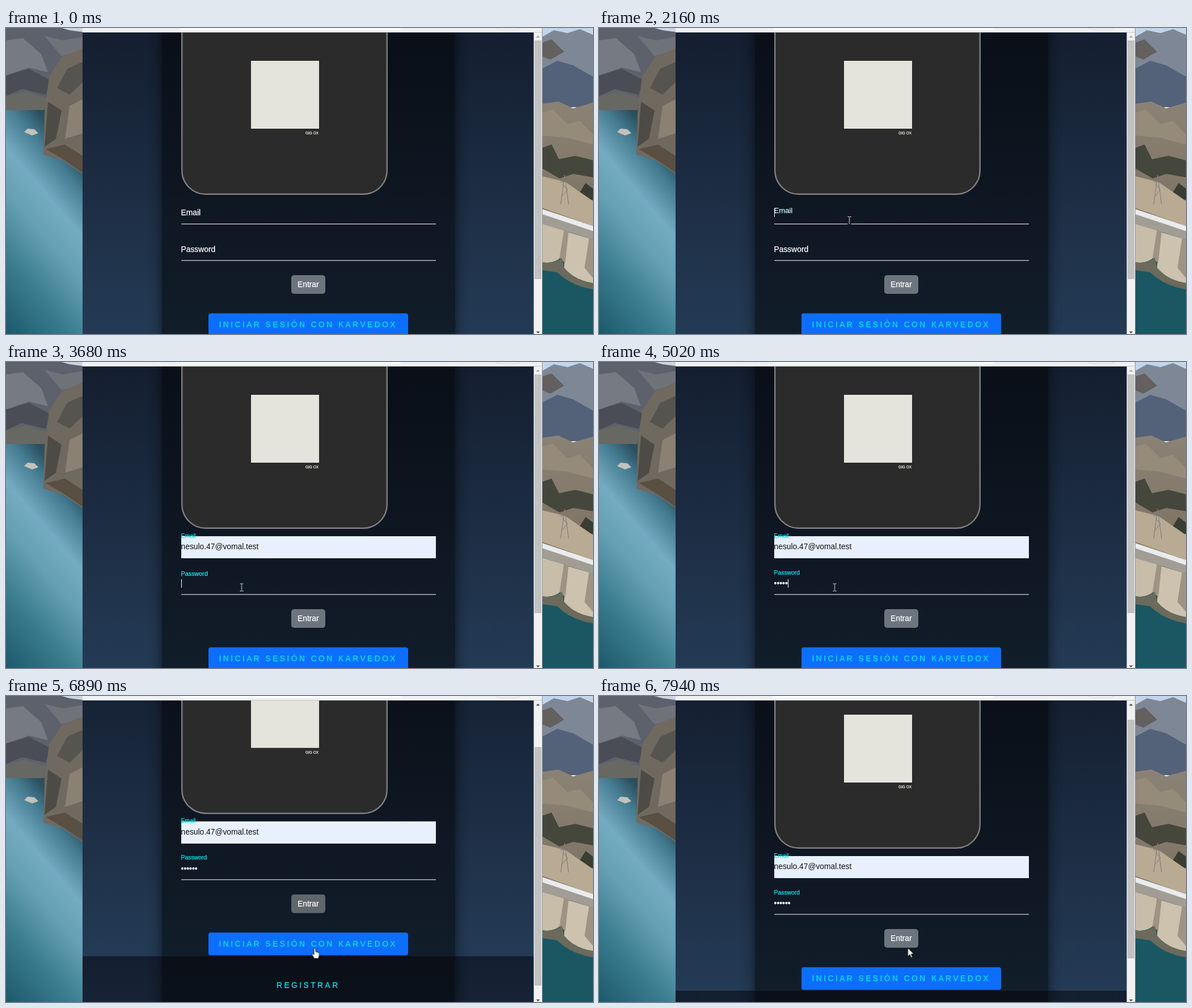
An HTML page for the animation above (8000 ms loop, 1035 px wide and 541 px high).

```html
<!DOCTYPE html>
<html lang="es">
<head>
<meta charset="utf-8">
<title>Login</title>
<style>
html, body { margin: 0; width: 100%; height: 100%; overflow: hidden; }
svg { display: block; width: 1035px; height: 541px; }
text {
  font: 13.8px "Liberation Sans", Arial, sans-serif;
  color: #fff; fill: currentColor; stroke: currentColor; stroke-width: .25; white-space: pre;
}
.link { letter-spacing: 3.45px; color: #03e9f4; }
.tiny { font-size: 6.5px; color: #e4e3dc; }
.menu text { font: 11.5px "Open Sans", "Noto Sans", sans-serif; color: #4c4c52; stroke: none; }
.off { opacity: 0; }
#mail { color: #111; stroke: none; }
#beam { mix-blend-mode: difference; fill: none; stroke: #fff; }
#arrow, #hand { fill: #fff; stroke: #000; stroke-width: .9; stroke-linejoin: round; }
</style>
</head>
<body>
<svg viewBox="0 0 1035 541">
  <defs>
    <linearGradient id="lake" x1=".4" x2="0" y2="1">
      <stop offset="0" stop-color="#2b4f5e"/><stop offset=".1" stop-color="#437a8f"/>
      <stop offset=".28" stop-color="#74abc2"/><stop offset=".45" stop-color="#66a0b4"/>
      <stop offset=".7" stop-color="#3a7d8f"/><stop offset="1" stop-color="#1c586a"/>
    </linearGradient>
    <linearGradient id="hill" x2="0" y2="1">
      <stop offset="0" stop-color="#8b8276"/><stop offset=".5" stop-color="#7d7362"/>
      <stop offset="1" stop-color="#b5a68e"/>
    </linearGradient>
    <linearGradient id="body" gradientUnits="userSpaceOnUse" x1="0" x2="0" y1="8" y2="546" spreadMethod="repeat">
      <stop stop-color="#141e30"/><stop offset="1" stop-color="#243b55"/>
    </linearGradient>
    <filter id="blur" x="-20%" width="140%"><feGaussianBlur stdDeviation="11"/></filter>
    <clipPath id="view"><path d="M135 8H931V541H135Z"/></clipPath>
    <clipPath id="right"><path d="M945 0H1035V541H945Z"/></clipPath>
    <mask id="around"><path d="M0-300H1035V900H0Z" fill="#fff"/><path d="M275-300H792V900H275Z"/></mask>
  </defs>

  <g id="lakeside">
    <path d="M0 0H135V160H0Z" fill="#5d616b"/>
    <path d="M98 0H135V7L112 4Z" fill="#c9d6e2"/>
    <path d="M0 22L30 18 62 46 74 78 40 70 0 84Z" fill="#767a83"/>
    <path d="M0 84L40 72 78 92 70 118 28 108 0 120Z" fill="#4a4d56"/>
    <path d="M68 14L100 22 135 16V40L98 50Z" fill="#70727a"/>
    <path d="M0 122L34 112 72 124 66 146 0 146Z" fill="#686863"/>
    <path d="M0 145H135V541H0Z" fill="url(#lake)"/>
    <path d="M135 36L98 52 76 86 68 150 66 224 100 234 135 258Z" fill="#70695f"/>
    <path d="M135 60L108 72 90 106 112 118 135 96Z" fill="#56544f"/>
    <path d="M74 130L98 146 88 196 68 210Z" fill="#4e4b46"/>
    <path d="M112 138L135 126V186L104 196Z" fill="#8a8174"/>
    <path d="M70 214L104 206 135 226V256L102 233Z" fill="#5a4f43"/>
    <path d="M32 184L38 178 50 179 57 186 46 190Z" fill="#c3c2bb"/>
  </g>

  <g id="dam" clip-path="url(#right)">
    <path d="M945 0H1035V40H945Z" fill="#c3d5e8"/>
    <path d="M945 16L966 4 990 9 1012 2 1035 12V140H945Z" fill="#7d8796"/>
    <path d="M945 72L972 58 1000 66 1035 86V140H945Z" fill="#536279"/>
    <path d="M945 26L962 20 984 42 960 56 945 50Z" fill="#63605f"/>
    <path d="M945 134L974 130 1000 142 1035 132V541H945Z" fill="url(#hill)"/>
    <path d="M945 150L964 144 990 170 1012 164 1035 188V206L990 194 945 190Z" fill="#968a79"/>
    <path d="M945 212L962 206 975 232 1004 226 1035 234V264L1000 258 976 266 945 248Z" fill="#45463c"/>
    <path d="M1012 290L1022 274 1035 284V304L1018 302Z" fill="#3a3d33"/>
    <path d="M945 262L986 272 1035 306V350L945 318Z" fill="#b9aa93"/>
    <path d="M978 312L985 260 992 312M980 298L990 286 981 276M977 272H993" fill="none" stroke="#777b7c"/>
    <path d="M945 320L1035 352V382L945 350Z" fill="#a19d94"/>
    <path d="M945 320L1035 350V359L945 329Z" fill="#e9ebec"/>
    <path d="M945 346L1035 374V541H945Z" fill="#1a5763"/>
    <path d="M945 346L984 358 980 404Q966 418 945 414Z" fill="#c8bda8"/>
    <path d="M988 360L1035 374V451Q1002 446 984 424Z" fill="#cdc2ad"/>
    <path d="M984 356L992 360 986 416 976 406ZM1028 372H1035V442L1020 424Z" fill="#9d9483"/>
    <path d="M945 414Q966 418 980 406L984 424Q1002 446 1035 451V462Q996 456 972 432L945 428Z" fill="#6b6a5c"/>
  </g>

  <path d="M135 0H946V541H135Z" fill="#f0f1f3"/>
  <path d="M306 0H697Q696 3 690 3H312Q307 3 306 0Z" fill="#fff"/>
  <path d="M863 0Q866 3 872 3H899Q905 3 908 0" fill="none" stroke="#d6d9dc"/>
  <path d="M135 7H945V8H135Z" fill="#c4c9cf"/>

  <g clip-path="url(#view)"><g id="page">
    <path d="M135 0H931V660H135Z" fill="url(#body)"/>
    <g mask="url(#around)"><rect x="275" y="-150" width="517" height="814" opacity=".6" filter="url(#blur)"/></g>
    <path d="M275-150H792V660H275Z" opacity=".5"/>
    <rect x="310.2" y="-67.8" width="361.6" height="361.6" rx="42" fill="#2b2b2b" stroke="#808080" stroke-width="2.4"/>
    <path d="M432 58H552V178H432Z" fill="#e4e3dc"/>
    <text class="tiny" x="528" y="188.3">GIG OX</text>

    <path d="M309 346H758V347H309ZM309 410.5H758V411.5H309Z" fill="#fff"/>
    <path id="fill" class="off" d="M309 308H758V347H309Z" fill="#e8f0fe"/>
    <text id="typed1" class="off" x="308.6" y="331">n</text>
    <text id="typed2" class="off" x="308.6" y="331">ne</text>
    <text id="mail" class="off" x="308.6" y="331">nesulo.47@vomal.test</text>
    <text id="mailLabel" x="308.6" y="331">Email</text>
    <text id="passLabel" x="308.6" y="396">Password</text>
    <g id="dots"></g>
    <path id="caret1" class="off" d="M309 319H310V334H309Z" fill="#fff"/>
    <path id="caret2" class="off" d="M309 384H310V399H309Z" fill="#fff"/>

    <rect id="enter" x="503" y="437" width="60" height="33" rx="5" fill="#6c757d"/>
    <text x="514" y="458">Entrar</text>
    <rect x="357" y="504.5" width="352" height="40" rx="4" fill="#0d6efd"/>
    <text class="link" x="375.5" y="529">INICIAR SESIÓN CON KARVEDOX</text>
    <text class="link" x="477" y="602">REGISTRAR</text>
  </g></g>

  <g id="scrollbar">
    <path d="M930.5 8H945V541H930.5Z" fill="#f1f1f1"/>
    <path id="thumb" d="M932 22H944V444H932Z" fill="#c1c1c1"/>
    <path id="up" d="M934.5 17L938 13.5 941.5 17Z" fill="#a3a3a3"/>
    <path d="M934.5 536.5L938 540 941.5 536.5Z" fill="#505050"/>
    <path d="M945 0H946V541H945Z" fill="#8d9399"/>
  </g>

  <g id="popup" class="menu off">
    <path d="M402 356L411 348 420 356Z" fill="#fff"/>
    <rect x="393" y="355" width="146" height="132" rx="5" fill="#fff"/>
    <path id="hover" class="off" d="M393 360H539V390H393Z" fill="#e6e6e8"/>
    <text x="404" y="379">nesulo.47@vomal.test</text>
    <text x="404" y="410">nesub@vomal.test</text>
    <text x="404" y="441">nesub</text>
    <text x="404" y="472">nesub@lom.test</text>
  </g>

  <path id="beam" class="off" d="M-3-6.5H-.5M.5-6.5H3M0-6V6M-3 6.5H-.5M.5 6.5H3"/>
  <path id="arrow" class="off" d="M0 0V15L3.5 11.7 6 17.3 8.3 16.3 5.9 10.8H10.6Z"/>
  <path id="hand" class="off" d="M-1.6 1.5Q0-1 1.6 1.5V6.5L7 8Q8.5 8.6 8.2 11.5L6.5 18.5H-.8L-5 12Q-6 9.8-4 9.8L-1.6 11.8Z"/>
</svg>
<script>
const LOOP = 8000;
const $ = id => document.getElementById(id);
const move = (x, y) => `translate(${x}px, ${y}px)`;

// Table rows are [time, value, easing?]; the first row also holds from the start.
function play(el, prop, rows, easing = 'steps(1)') {
  const frames = rows.map(([t, v, ease]) => ({ offset: t / LOOP, [prop]: v, easing: ease || easing }));
  const ends = [{ ...frames[0], offset: 0 }, ...frames, { ...frames.at(-1), offset: 1 }];
  const anim = el.animate(ends, { duration: LOOP, iterations: Infinity });
  anim.startTime = 0;
}

// Spans are [from, to] pairs during which the element shows.
function show(el, ...spans) {
  play(el, 'opacity', [[0, 0], ...spans.flatMap(([a, b]) => b < LOOP ? [[a, 1], [b, 0]] : [[a, 1]])]);
}

function float(el, t, dy) {
  const change = (prop, from, to) => play(el, prop, [[t, from, 'ease'], [t + 500, to]]);
  change('transform', move(0, 0), move(0, dy));
  change('fontSize', '13.8px', '10.36px');
  change('color', '#fff', '#03e9f4');
}

// Email field
float($('mailLabel'), 2080, -20.3);
show($('typed1'), [2350, 2550]);
show($('typed2'), [2550, 2770]);
show($('caret1'), [2080, 2770]);
play($('caret1'), 'transform', [[0, move(0, 0)], [2350, move(7, 0)], [2550, move(15, 0)]]);
show($('popup'), [2420, 2970]);
show($('hover'), [2770, 2970]);
show($('fill'), [2770, LOOP]);
show($('mail'), [2770, LOOP]);

// Password field
float($('passLabel'), 3390, -20.3);
const keys = [3820, 3890, 3960, 4820, 5020, 5220];
keys.forEach((t, i) => {
  const dot = document.createElementNS('http://www.w3.org/2000/svg', 'text');
  dot.textContent = '•';
  dot.setAttribute('x', 308.6 + i * 4.83);
  dot.setAttribute('y', 396);
  $('dots').append(dot);
  show(dot, [t, LOOP]);
});
play($('caret2'), 'transform', [[0, move(0, 0)], ...keys.map((t, i) => [t, move(Math.floor(4.83 * (i + 1)), 0)])]);
show($('caret2'), [3390, 4490], [4820, 5720], [6320, 6540]);

play($('enter'), 'fill', [[0, '#6c757d'], [5860, '#5f666c'], [7740, '#6c757d']]);

// Wheel scrolling
const scroll = [[0, 0], [6890, 86.3], [7280, 100], [7410, 110.5], [7740, 90], [7810, 50], [7940, 25]];
play($('page'), 'transform', scroll.map(([t, y]) => [t, move(0, -y)]));
play($('thumb'), 'transform', scroll.map(([t, y]) => [t, move(0, Math.round(y * .785))]));
play($('up'), 'fill', [[0, '#a3a3a3'], [6890, '#505050']]);

// Pointer
const path = [
  [200, 886, 538], [480, 760, 470], [700, 560, 372], [940, 441.5, 339], [1150, 441.5, 340],
  [2400, 441.5, 340], [2600, 454.5, 361], [2650, 454.5, 361], [2770, 452, 371], [2970, 452, 372],
  [3380, 415.5, 398.5], [5220, 415.5, 398.5], [5500, 455, 425], [5800, 541, 462], [5990, 539.5, 451.5],
  [6540, 539.5, 451.5], [6750, 544.5, 445.5]
].map(([t, x, y]) => [t, move(x, y)]);
for (const id of ['beam', 'arrow', 'hand']) play($(id), 'transform', path, 'linear');
show($('arrow'), [200, 890], [2480, 3300], [5340, 5780], [7350, LOOP]);
show($('beam'), [890, 2480], [3300, 5340]);
show($('hand'), [5780, 7350]);
</script>
</body>
</html>
```
